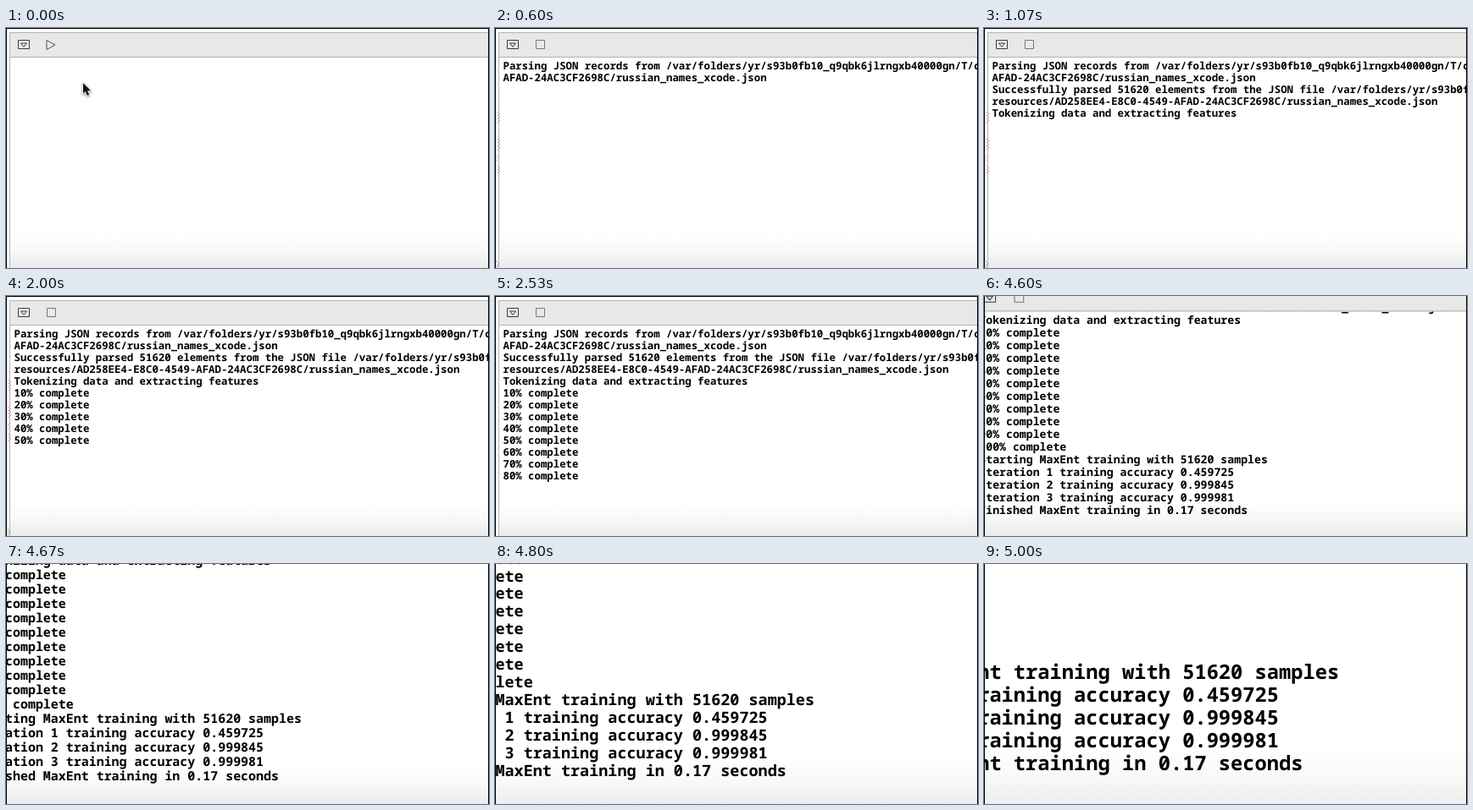
An HTML page with a canvas for the animation above (5070 ms loop, 570 by 284 pixels).

```html
<!DOCTYPE html>
<html lang="en">
<head>
<meta charset="utf-8">
<title>Training console</title>
<style>
html, body { margin: 0; width: 570px; height: 284px; overflow: hidden; background: #fff; }
canvas { display: block; }
</style>
</head>
<body>
<canvas id="stage" width="570" height="284"></canvas>
<script>
const W = 570, H = 284, LOOP = 5070, TICK = 200 / 3;
const LINE = 14, TEXT_X = 9.5, BASE_Y = 49, HEADER_END = 35;
const FONT = 'bold 12.35px "Noto Sans Mono", "DejaVu Sans Mono", monospace';
const ctx = document.getElementById('stage').getContext('2d');

// Console output: [time it appears, text]
const log = [
  [600, 'Parsing JSON records from /var/folders/yr/s93b0fb10_q9qbk6jlrngxb40000gn/T/com'],
  [600, 'AFAD-24AC3CF2698C/russian_names_xcode.json'],
  [670, 'Successfully parsed 51620 elements from the JSON file /var/folders/yr/s93b0fb10'],
  [670, 'resources/AD258EE4-E8C0-4549-AFAD-24AC3CF2698C/russian_names_xcode.json'],
  [1070, 'Tokenizing data and extracting features'],
  ...[1130, 1200, 1600, 1800, 2000, 2200, 2400, 2530, 2800, 3070]
    .map((t, i) => [t, (i + 1) * 10 + '% complete']),
  [3070, 'Starting MaxEnt training with 51620 samples'],
  ...['0.459725', '0.999845', '0.999981']
    .map((a, i) => [3070, `Iteration ${i + 1} training accuracy ${a}`]),
  [3070, 'Finished MaxEnt training in 0.17 seconds']
];

const step = ms => Math.floor((ms + 4) / TICK);

function rect(x, y, w, h, fill) {
  ctx.fillStyle = fill;
  ctx.fillRect(x, y, w, h);
}

function path(points, stroke, fill, width = 1) {
  ctx.beginPath();
  points.forEach(([x, y]) => ctx.lineTo(x, y));
  ctx.closePath();
  if (fill) { ctx.fillStyle = fill; ctx.fill(); }
  if (stroke) { ctx.strokeStyle = stroke; ctx.lineWidth = width; ctx.stroke(); }
}

function box(x, y, w, h, stroke) {
  path([[x, y], [x + w, y], [x + w, y + h], [x, y + h]], stroke);
}

function drawPane() {
  rect(0, 0, W, H + 10, '#fff');
  const shade = ctx.createLinearGradient(0, 244, 0, H);
  shade.addColorStop(0, '#fff');
  shade.addColorStop(0.5, '#f8f8f8');
  shade.addColorStop(1, '#ebebeb');
  rect(5, 244, W, 40, shade);
}

function drawHeader(running) {
  rect(5, 5, W, 30, '#e8e8e8');
  rect(4, 5, W, 1, '#b4b4b4');
  rect(4, 34, W, 1, '#b0b0b0');
  rect(4, 5, 1, H, '#b4b4b4');
  box(14.5, 14.5, 13, 10, '#3c3c3c');
  path([[17.5, 18], [24.5, 18], [21, 22.3]], '#3c3c3c');
  if (running) box(48.5, 14.5, 10, 10, '#777');
  else path([[48, 14.5], [58, 20], [48, 25.5]], '#555');
}

function drawLog(t) {
  const top = t >= 3070 ? 4 : 0;
  ctx.save();
  ctx.beginPath();
  ctx.rect(5, HEADER_END, W, H);
  ctx.clip();
  ctx.font = FONT;
  ctx.textRendering = 'geometricPrecision';
  ctx.fillStyle = '#000';
  log.forEach(([at, text], i) => {
    if (t >= at && i >= top - 1) ctx.fillText(text, TEXT_X, BASE_Y + (i - top) * LINE);
  });
  ctx.restore();
}

// Sliver of the neighbouring editor at the left edge
function drawSliver() {
  [[99, 112], [131, 144], [150, 160], [163, 173]].forEach(([a, b]) => {
    for (let y = a; y < b; y += 2) rect(2 + (y * 7) % 4, y, 1, 1, '#d8707c');
  });
  for (let y = 276; y < 283; y += 2) rect(2 + y % 3, y, 1, 1, '#555');
}

function drawPointer(x, y) {
  ctx.save();
  ctx.translate(x, y);
  ctx.shadowColor = 'rgba(0,0,0,.4)';
  ctx.shadowBlur = 3;
  ctx.shadowOffsetY = 1;
  const arrow = [[0, 0], [0, 12.5], [2.8, 10], [5, 15], [7.2, 14], [5.1, 9.2], [9, 9]];
  path(arrow, '#fff', '#fff', 1.6);
  ctx.shadowColor = 'transparent';
  path(arrow, null, '#111');
  ctx.restore();
}

function draw(t) {
  ctx.setTransform(1, 0, 0, 1, 0, 0);
  const zooming = t >= 4600;
  if (zooming) {
    const s = 1.069 + 0.1422 * step(t - 4600);
    ctx.translate(229, 275.5);
    ctx.scale(s, s);
    ctx.translate(-229, -275.5);
  }
  drawPane();
  drawHeader(t >= 530);
  drawLog(t);
  if (t >= 330 && t < 2070) drawSliver();
  if (t < 330) {
    const p = step(t) / 5;
    const e = p * p * (3 - 2 * p);
    drawPointer(91 - 103 * e, 65 + 6 * e);
  }
  ctx.setTransform(1, 0, 0, 1, 0, 0);
  rect(0, 0, 1, H, '#000');
  rect(W - 1, 0, 1, H, '#000');
  if (!zooming) rect(0, 0, W, 1, '#000');
}

const start = performance.now();
function frame() {
  draw((performance.now() - start) % LOOP);
  requestAnimationFrame(frame);
}
frame();
</script>
</body>
</html>
```
